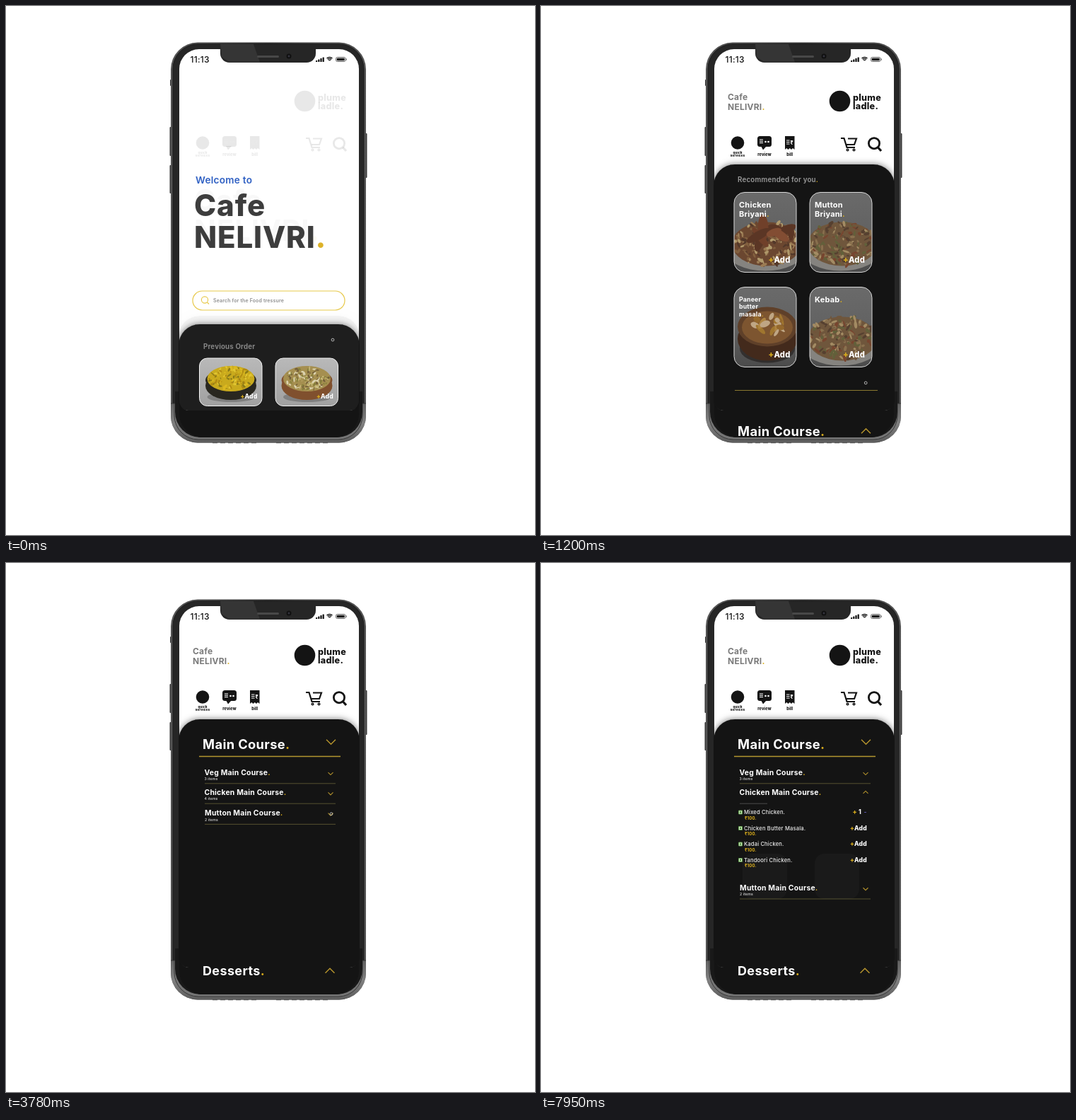
These frames come from a looping animation (748 by 748 pixels, 7980 ms). An HTML page with a canvas:

```html
<!DOCTYPE html>
<html lang="en">
<head>
<meta charset="utf-8">
<style>
html, body { margin: 0; width: 100%; height: 100%; overflow: hidden; background: #fff; }
canvas { display: block; width: 748px; height: 748px; }
</style>
</head>
<body>
<canvas></canvas>
<script>
const canvas = document.querySelector('canvas');
const ctx = canvas.getContext('2d');
const ratio = window.devicePixelRatio || 1;
canvas.width = canvas.height = 748 * ratio;

const LOOP = 7980, STEP = 30;
const INK = '#141414', GOLD = '#dbae1c', OCHRE = '#b3922c';
const TAU = Math.PI * 2;

const mix = (a, b, p) => a + (b - a) * p;

// S-shaped easing centred on a time, with long tails
function ease(t, centre, rate) {
  const p = 1 / (1 + Math.exp((centre - t) * rate));
  return p > 0.996 ? 1 : p;
}

function alpha(a, draw) {
  if (a <= 0.001) return;
  ctx.save();
  ctx.globalAlpha *= a;
  draw();
  ctx.restore();
}

function box(x, y, w, h, r, fill, stroke, width = 1) {
  ctx.beginPath();
  ctx.roundRect(x, y, w, h, r);
  if (fill) { ctx.fillStyle = fill; ctx.fill(); }
  if (stroke) { ctx.strokeStyle = stroke; ctx.lineWidth = width; ctx.stroke(); }
}

function clipBox(x, y, w, h, r, draw) {
  ctx.save();
  ctx.beginPath();
  ctx.roundRect(x, y, w, h, r);
  ctx.clip();
  draw();
  ctx.restore();
}

function oval(x, y, rx, ry, fill, turn = 0) {
  ctx.beginPath();
  ctx.ellipse(x, y, rx, ry, turn, 0, TAU);
  ctx.fillStyle = fill;
  ctx.fill();
}

function ring(x, y, r, color, width) {
  ctx.beginPath();
  ctx.arc(x, y, r, 0, TAU);
  ctx.strokeStyle = color;
  ctx.lineWidth = width;
  ctx.stroke();
}

function line(color, width, ...points) {
  ctx.beginPath();
  points.forEach(([x, y]) => ctx.lineTo(x, y));
  ctx.strokeStyle = color;
  ctx.lineWidth = width;
  ctx.stroke();
}

function shape(color, ...points) {
  ctx.beginPath();
  points.forEach(([x, y]) => ctx.lineTo(x, y));
  ctx.fillStyle = color;
  ctx.fill();
}

// A leading plus and a closing dot take the accent colour
function text(s, x, y, size, weight, color, accent = color) {
  ctx.font = `${weight} ${size}px Inter, sans-serif`;
  ctx.letterSpacing = `${size * 0.02}px`;
  for (const part of s.split(/(^\+|\.$)/)) {
    ctx.fillStyle = /^[+.]$/.test(part) ? accent : color;
    ctx.fillText(part, x, y);
    x += ctx.measureText(part).width;
  }
}

function centred(s, x, y, size) {
  ctx.textAlign = 'center';
  text(s, x, y, size, 800, INK);
  ctx.textAlign = 'left';
}

function gradient(x0, y0, x1, y1, ...colors) {
  const g = ctx.createLinearGradient(x0, y0, x1, y1);
  colors.forEach((c, i) => g.addColorStop(i / (colors.length - 1), c));
  return g;
}

function chevron(x, y, half, up) {
  const d = (up ? -1 : 1) * half / 4;
  line(OCHRE, half > 5 ? 1.5 : 1.1, [x - half, y - 2 * d], [x, y + 2 * d], [x + half, y - 2 * d]);
}

function scatter(seed, count, x, y, rx, ry, colors, size) {
  const random = () => (seed = (seed * 16807) % 2147483647) / 2147483647;
  for (let i = 0; i < count; i++) {
    const angle = random() * TAU, far = Math.sqrt(random());
    oval(x + Math.cos(angle) * far * rx, y + Math.sin(angle) * far * ry,
      size * (0.5 + random()), size * (0.25 + random() * 0.4),
      colors[Math.floor(random() * colors.length)], random() * 3);
  }
}

function phone() {
  for (const [x, y, h] of [[232, 104, 9], [231.5, 171, 41], [231.5, 225, 40], [507.8, 180, 63]])
    box(x, y, 2.7, h, 1, '#3a3a3a');
  for (const [x, w] of [[292, 63], [382, 73]]) {
    ctx.setLineDash([7, 4]);
    line('#555', 1.5, [x, 617.5], [x + w, 617.5]);
    ctx.setLineDash([]);
  }
  box(233, 51.5, 276, 566, 38, gradient(233, 0, 509, 0, '#555', '#2f2f2f', '#555'));
  box(236, 54, 270, 561, 35, '#262626', '#1a1a1a');
  clipBox(230, 562, 282, 58, 0, () => {
    box(233, 51.5, 276, 566, 38, gradient(0, 562, 0, 618, '#626262', '#808080', '#5c5c5c'));
    box(238, 60, 266, 553, 34, '#757575', '#3a3a3a');
  });
  line('#333', 1, [233, 562], [245, 562]);
  line('#333', 1, [499, 562], [509, 562]);
  box(239, 545, 265, 65, [0, 0, 36, 36], '#191919');
  box(245, 61, 254, 549, [28, 28, 34, 34], INK);
  box(245, 61, 254, 511, [28, 28, 14, 14], '#fff');
}

function notch() {
  box(303, 57, 135, 23, [0, 0, 13, 13], '#262626');
  shape('#353535', [303, 54], [350, 54], [359, 79.5], [316, 79.5], [305, 72]);
  box(355, 70, 31, 3, 1.5, '#484848');
  oval(400, 71, 3.5, 3.5, '#111');
  oval(400, 71, 1.4, 1.4, '#34343f');
  text('11:13', 260.5, 79.5, 12, 500, '#111');
  for (let i = 0; i < 4; i++) box(438 + i * 3.2, 77 - i * 1.5, 2.2, 2 + i * 1.5, 0.5, '#111');
  for (const r of [2, 4, 6]) {
    ctx.beginPath();
    ctx.arc(457.5, 78.5, r, -2.3, -0.84);
    ctx.strokeStyle = '#111';
    ctx.lineWidth = 1.3;
    ctx.stroke();
  }
  box(466.5, 72.5, 13.5, 6, 2, null, '#444', 0.8);
  box(467.7, 73.7, 11, 3.6, 1, '#111');
  box(480.6, 74.2, 1, 2.6, 0.5, '#444');
}

const clipScreen = draw => clipBox(244, 61, 256, 511, [28, 28, 14, 14], draw);

// The shadow stays outside the panel, so a fading panel is evenly tinted
function panel(top) {
  clipScreen(() => {
    const area = [244, top, 256, 620 - top, 30];
    ctx.save();
    ctx.beginPath();
    ctx.rect(0, 0, 748, 748);
    ctx.roundRect(...area);
    ctx.clip('evenodd');
    ctx.shadowColor = 'rgba(0,0,0,.55)';
    ctx.shadowBlur = 10 * ratio;
    box(...area, INK);
    ctx.restore();
    box(...area, INK);
  });
}

function header(dy) {
  ctx.save();
  ctx.translate(0, dy);
  oval(422.5, 134.5, 14.8, 14.8, INK);
  text('plume', 441, 133.5, 12.6, 800, INK);
  text('ladle.', 441, 146, 12.6, 800, INK);

  oval(278, 193.5, 9.3, 9.3, INK);
  centred('quick', 278, 208.8, 4.6);
  centred('services', 278, 212.6, 4.6);

  box(306, 184, 20, 15, 3.5, INK);
  shape(INK, [311, 198], [319, 198], [314, 203.5]);
  for (let i = 0; i < 3; i++) line('#fff', 1, [309, 189 + i * 2.3], [314, 189 + i * 2.3]);
  oval(317.5, 192, 1.3, 1.3, '#fff');
  oval(321.5, 192, 1.3, 1.3, '#fff');
  centred('review', 316, 212, 5.7);

  shape(INK, [345, 184], [358.5, 184], [358.5, 203], [356, 201], [354, 203],
    [351.7, 201], [349.5, 203], [347.2, 201], [345, 203]);
  for (let i = 0; i < 3; i++) line('#fff', 1, [347, 190 + i * 2.5], [351.5, 190 + i * 2.5]);
  text('₹', 352.5, 195.5, 7, 800, '#fff');
  centred('bill', 351.7, 212, 5.7);

  line(INK, 2.2, [424, 187], [428.5, 187], [432.5, 200], [444, 200]);
  line(INK, 2.2, [434, 187.5], [446, 187.5], [443, 196], [432, 196]);
  ring(433.5, 203.5, 1.3, INK, 1.6);
  ring(442.5, 203.5, 1.3, INK, 1.6);
  ring(471, 194.2, 7.6, INK, 2.8);
  line(INK, 3.2, [476.5, 200], [481, 205]);
  ctx.restore();
}

function cafeName(p, dy, color, weight) {
  const size = mix(42, 12, p);
  text('Cafe', mix(266, 264, p), mix(297, 133.3, p) + dy, size, weight, color);
  text('NELIVRI.', mix(266, 264, p), mix(341.5, 147, p) + dy, size, weight, color, GOLD);
}

function riceCard(x, seed, rim, inside) {
  box(x, 498, 88.5, 67.5, 11, gradient(0, 498, 0, 566, '#b9b9b9', '#a0a0a0'));
  clipBox(x, 498, 88.5, 67.5, 11, () => {
    oval(x + 45, 553, 34, 7, 'rgba(60,60,60,.35)');
    oval(x + 44.5, 537, 36, 20, rim);
    oval(x + 44.5, 529, 36, 16, rim);
    oval(x + 44.5, 527, 33.5, 18, inside[0]);
    scatter(seed, 150, x + 44.5, 526, 31, 16, inside, 2.4);
  });
  box(x, 498, 88.5, 67.5, 11, null, '#f2f2f2');
  text('+Add', x + 58, 555, 8.6, 800, '#fff', GOLD);
}

function previousCards() {
  riceCard(273.5, 17, '#292720', ['#c9aa1d', '#e0c532', '#b18a12', '#8a7a18', '#ddb91f']);
  riceCard(381, 91, '#80502e', ['#a58f50', '#c8ba78', '#87803c', '#dcd3ae', '#75603a']);
}

function home() {
  text('Welcome to', 268, 251, 13.6, 600, '#2457c0');
  panel(450);
  cafeName(0, 0, '#333', 800);
  box(264, 403, 215, 27, 13.5, null, '#e6c640', 1.2);
  ring(281, 415.5, 4.6, '#e6c640', 1.1);
  line('#e6c640', 1.1, [284.5, 419], [287, 421.5]);
  text('Search for the Food tressure', 293, 419, 7, 600, '#888');
  text('Previous Order', 279, 485, 9.7, 700, '#8b8b8b');
}

const DISHES = {
  biryani: ['#6b4730', '#82603f', '#9c7c54', '#52382a', '#b09a6c'],
  mixed: ['#6f563c', '#89704e', '#a38b63', '#564030', '#62603a', '#77452f']
};

function dishCard(x, y, lines, dish, size = 11) {
  box(x, y, 88, 113, 15, gradient(0, y, 0, y + 113, '#6a6a6a', '#626262', '#4b4b4b'));
  clipBox(x, y, 88, 113, 15, () => {
    if (dish === 'curry') {
      oval(x + 47, y + 87, 39, 20, 'rgba(20,15,12,.5)');
      oval(x + 47, y + 73, 42, 31, '#432a1c');
      oval(x + 47, y + 56, 42, 28, '#5f4029');
      oval(x + 47, y + 57, 36, 23, '#7d5530');
      scatter(33, 16, x + 47, y + 57, 29, 16, ['#a0762f', '#ad8442', '#bfa684', '#94682c'], 7);
    } else {
      oval(x + 44, y + 84, 54, 27, '#85837f');
      oval(x + 46, y + 73, 49, 31, DISHES[dish][0]);
      scatter(Math.floor(x + y), 190, x + 46, y + 72, 48, 31, DISHES[dish], 3.6);
      if (dish === 'biryani') scatter(7, 9, x + 50, y + 58, 32, 13, ['#70402a', '#824d33', '#5b3625'], 13);
    }
  });
  box(x, y, 88, 113, 15, null, '#d8d8d8');
  lines.forEach((s, i) => text(s, x + 7, y + 21.5 + i * size * 1.2 - (size < 10 ? 1.5 : 0), size, 700, '#fff', GOLD));
  text('+Add', x + (x < 300 ? 48.5 : 47), y + 99.5, 11.2, 800, '#fff', GOLD);
}

function recommended(dy, secondRow) {
  clipScreen(() => {
    ctx.translate(0, dy);
    text('Recommended for you.', 278, 249, 9.8, 600, '#9a9a9a', GOLD);
    dishCard(273, 263.5, ['Chicken', 'Briyani.'], 'biryani');
    dishCard(380, 263.5, ['Mutton', 'Briyani.'], 'mixed');
    alpha(secondRow, () => {
      dishCard(273, 397.5, ['Paneer', 'butter', 'masala.'], 'curry', 8.8);
      dishCard(380, 397.5, ['Kebab.'], 'mixed');
    });
  });
}

function mainCourse(p) {
  alpha(1 - p, () => line('#8a7830', 1.1, [274, 543.5], [476, 543.5]));
  text('Main Course.', 278, mix(607.7, 262.7, p), 18.3, 700, '#fff', GOLD);
  chevron(459.5, mix(601, 253, p), 6.5, p < 0.5);
}

function section(title, count, x, y, open) {
  text(title, x, y, 10.4, 700, '#fff', GOLD);
  alpha(1 - open, () => {
    text(count, x, y + 7.2, 5.2, 500, '#ddd');
    line('#55502f', 1, [281, y + 12], [466, y + 12]);
    chevron(459, y - 2, 3.5, false);
  });
  alpha(open, () => {
    line('#4a4a4a', 1, [281, y + 12], [320, y + 12]);
    chevron(459, y - 4, 3.5, true);
  });
}

function dishRow(name, y, added) {
  box(279.5, y - 5, 5, 5, 0.5, '#d9ead0', '#5c9a46');
  oval(282, y - 2.5, 1.2, 1.2, '#3c8528');
  text(name, 287, y, 7.6, 500, '#eee');
  text('₹100.', 288, y + 7.6, 6, 700, GOLD);
  alpha(1 - added, () => text('+Add', 437, y, 8.6, 800, '#fff', GOLD));
  alpha(added, () => {
    text('+', 440.5, y, 9, 800, GOLD);
    text('1', 449, y, 8.6, 800, '#fff');
    text('-', 456.5, y, 8.6, 700, '#5a55a8');
  });
}

function menu(p, open, added) {
  ctx.save();
  ctx.translate(0, 345 * (1 - p));
  line('#b3962f', 1.3, [273, 273.5], [473, 273.5]);
  section('Veg Main Course.', '3 items', 280.5, 299.8, 0);
  section('Chicken Main Course.', '4 items', 280.5, 328.2, open);
  section('Mutton Main Course.', '2 items', 281, mix(357.4, 463, open), 0);
  alpha(open, () => ['Mixed Chicken.', 'Chicken Butter Masala.', 'Kadai Chicken.', 'Tandoori Chicken.']
    .forEach((name, i) => dishRow(name, 355 + i * 22.5, i ? 0 : added)));
  ctx.restore();
  text('Desserts.', 278, 583, 18, 700, '#fff', GOLD);
  chevron(458, 576.5, 6.5, true);
}

function pointer(t, added) {
  const stops = [[1218, 0.007, 456, 602], [3060, 0.018, 460, 355],
    [4170, 0.012, 459, 326], [5800, 0.014, 449.5, 356]];
  let x = 462, y = 472;
  for (const [centre, rate, toX, toY] of stops) {
    const p = ease(t, centre, rate);
    x = mix(x, toX, p);
    y = mix(y, toY, p);
  }
  alpha(1 - added, () => ring(x, y, 1.9, '#c4c4c4', 0.9));
}

function draw(t) {
  const toList = ease(t, 279, 0.0105);
  const toMenu = ease(t, 2896, 0.014);
  const open = ease(t, 5400, 0.0125);
  const added = ease(t, 6550, 0.014);
  const next = ease(t, LOOP + 279, 0.0105);
  const late = toList ** 8;

  ctx.setTransform(ratio, 0, 0, ratio, 0, 0);
  ctx.fillStyle = '#fff';
  ctx.fillRect(0, 0, 748, 748);
  phone();

  clipBox(244, 61, 256, 549, [28, 28, 34, 34], () => {
    const headerShift = -4 * toMenu;
    alpha(toList * (2 - toList), () => header(headerShift));
    alpha(toList, () => cafeName(toList, headerShift, '#7a7a7a', 700));
    alpha(toList * (1 - toMenu), () => {
      panel(mix(450, 224, toList));
      recommended(337 * (1 - toList), late);
    });
    alpha(1 - toList, home);
    alpha(Math.min(1, (1 - toList) * 1.8), previousCards);
    if (toMenu > 0.002) panel(mix(573, 221, toMenu));
    alpha(toMenu, () => menu(toMenu, open, added));
    alpha(late, () => mainCourse(toMenu));
    alpha(next, () => {
      box(285, 411, 63, 64, 14, '#aaa');
      box(387, 411, 63, 64, 14, '#aaa');
    });
    pointer(t, added);
  });
  notch();
}

function frame(now) {
  draw(Math.floor((now % LOOP) / STEP) * STEP);
  requestAnimationFrame(frame);
}
requestAnimationFrame(frame);
</script>
</body>
</html>
```
